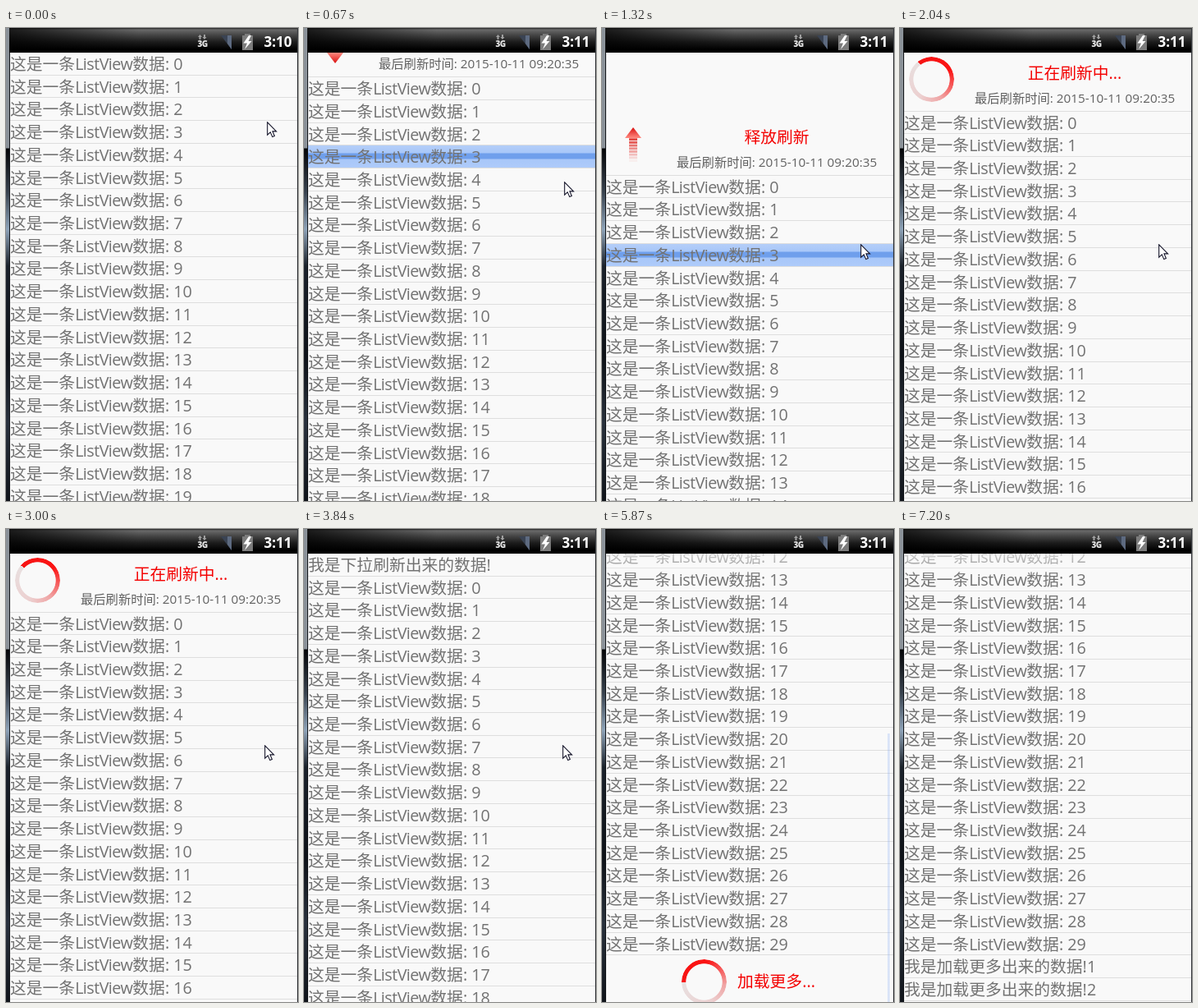
An HTML page that plays this animation: 356 px wide and 576 px high, repeating every 8 s.

```html
<!DOCTYPE html>
<html lang="zh-CN">
<head>
<meta charset="utf-8">
<title>ListView</title>
<style>
html, body { margin: 0; width: 100%; height: 100%; overflow: hidden; background: #000; }
#stage {
  position: relative; width: 356px; height: 576px; overflow: hidden; background: #15181c;
  font-family: 'Open Sans', 'Noto Sans CJK SC', 'Noto Sans CJK', sans-serif;
  font-size: 19.8px; line-height: 27.72px; color: #727272; white-space: nowrap;
}
#stage div, #stage svg { position: absolute; }
#edge {
  left: 0; top: 0; width: 4px; height: 576px;
  background: linear-gradient(#8b9299 146px, #050608 147px, #39434f 200px, #8ea3b8 245px, #1b222b 290px, #0e1218 400px, #2a323d 480px, #10141a);
}
#view { left: 5px; top: 30px; width: 350px; height: 546px; overflow: hidden; background: #f9f9f9; }
#list { left: 0; width: 350px; }
.row { left: 0; width: 350px; height: 26.72px; border-bottom: 1px solid #dedede; }
.row span { letter-spacing: -.55px; }
.press { background: linear-gradient(#b4cef8 0, #a8c7f9 9px, #6f9fec 10px, #6f9fec 16px, #a8c7f9 17px, #aecbfa); }
#head { left: 0; top: -72px; width: 350px; height: 71px; border-bottom: 1px solid #dedede; }
#title { left: 68px; top: 11px; width: 280px; text-align: center; color: #f40000; }
#stamp { left: 86px; top: 42px; font-size: 15.3px; color: #606060; }
#arrow { left: 23px; top: 12px; }
.ring {
  width: 55px; height: 55px; border-radius: 50%;
  background: conic-gradient(from -48deg, #f61414 0, #fb1414 100deg, #f65a5a 145deg, #f0a4a4 190deg, #ecd0d0 250deg, #e8e0e0 360deg);
  -webkit-mask: radial-gradient(circle, transparent 21.8px, #000 22.6px);
  mask: radial-gradient(circle, transparent 21.8px, #000 22.6px);
}
#head .ring { left: 5.5px; top: 5.5px; }
#foot { left: 0; width: 350px; height: 65px; }
#foot .ring { left: 92px; top: 5px; }
#more { left: 160px; top: 18px; color: #f40000; }
#fade { left: 0; top: 0; width: 350px; height: 28px; background: linear-gradient(rgba(249,249,249,.7), rgba(249,249,249,0)); }
#thumb { left: 343px; width: 3px; height: 546px; background: linear-gradient(90deg, #9cbcf7, #6c9af0, #9cbcf7); }
#bar {
  left: 4px; top: 0; width: 352px; height: 30px;
  background: linear-gradient(90deg, rgba(0,0,0,.75), rgba(0,0,0,0) 45%), linear-gradient(#222 0, #6a6a6a 2px, #484848 8px, #1c1c1c 17px, #000 26px);
}
#clock { left: 314.5px; top: 3px; font-size: 17px; font-weight: 700; color: #fff; }
#net { left: 233.5px; top: 12px; font-size: 10px; line-height: 14px; letter-spacing: -.5px; font-weight: 800; color: #e4e4e4; }
#rim { left: 355px; top: 0; width: 1px; height: 576px; background: #33363a; }
</style>
</head>
<body>
<div id="stage">
  <div id="edge"></div>
  <div id="view">
    <div id="list">
      <div id="head">
        <svg id="arrow" width="20" height="44">
          <defs><linearGradient id="red" x1="0" y1="0" x2="0" y2="1">
            <stop offset="0" stop-color="#ff8a80"/><stop offset="1" stop-color="#d90f0f"/>
          </linearGradient></defs>
          <path d="M0 30H20L10 43Z" fill="url(#red)"/>
        </svg>
        <div class="ring"></div>
        <div id="title"></div>
        <div id="stamp">最后刷新时间: 2015-10-11 09:20:35</div>
      </div>
      <div id="foot"><div class="ring"></div><div id="more">加载更多...</div></div>
    </div>
    <div id="fade"></div>
    <div id="thumb"></div>
  </div>
  <div id="bar"></div>
  <svg width="356" height="30">
    <path d="M236.5 8L239 11H237.5V14H235.5V11H234ZM242 14L239.5 11H241V8H243V11H244.5Z" fill="#a0a0a0"/>
    <path d="M262 9H275V26Z" fill="#3a4353"/>
    <path d="M270 9H275V26L270 19Z" fill="#5d6a80"/>
    <path d="M291 7H298V9H301V27H288V9H291Z" fill="#7c7c7c"/>
    <path d="M296 9L289.5 18.5H294L291 26L299.5 16H295.5L299 9Z" fill="#fff"/>
  </svg>
  <div id="net">3G</div>
  <div id="clock"></div>
  <div id="rim"></div>
  <svg id="cursor" width="14" height="21">
    <path d="M.7 .8V16.2L4.3 12.9L6.8 18.6L9.4 17.5L7 11.9H11.6Z" fill="#fff" stroke="#15152a" stroke-width="1.1"/>
  </svg>
</div>
<script>
const LOOP = 8000, PITCH = 27.72, HEAD = 72;
const PULL = 400, PRESS = 530, FLIP = 926, RELEASE = 1740, LOADED = 3840;
const GRAB = 4240, SCROLL = 4520, BOTTOM = 5210, APPENDED = 7200;

// spells of movement: start, end, number of picture changes
const SPELLS = [
  [PULL, 1320, 8], [RELEASE, 2690, 8], [2840, LOADED, 8],
  [GRAB, BOTTOM, 8], [5330, 6260, 8], [6380, APPENDED, 6]
];

const $ = id => document.getElementById(id);
const show = (el, on) => { el.style.visibility = on ? 'visible' : 'hidden'; };
const part = (t, a, b) => Math.min(1, Math.max(0, (t - a) / (b - a)));
const mix = (a, b, p) => a + (b - a) * p;

// the screen recorder's clock: evenly spaced changes in a spell, rest between
function snap(t) {
  const spell = SPELLS.findLast(s => s[0] <= t);
  if (!spell) return 0;
  const [a, b, n] = spell, step = (b - a) / (n - 1);
  return a + step * Math.min(n - 1, Math.floor((t - a + 12) / step));
}

const list = $('list');
function addRow(i, html) {
  const row = document.createElement('div');
  row.className = 'row';
  row.style.top = i * PITCH + 'px';
  row.innerHTML = html;
  list.append(row);
  return row;
}
const rows = Array.from({ length: 30 }, (_, i) => addRow(i, `这是一条<span>ListView</span>数据: ${i}`));
const fresh = addRow(-1, '我是下拉刷新出来的数据!');
const extra = [1, 2].map(n => addRow(29 + n, `我是加载更多出来的数据!${n}`));
$('foot').style.top = 30 * PITCH + 'px';

// fading stripes of the arrow's tail
for (let i = 0; i < 8; i++) {
  const bar = document.createElementNS('http://www.w3.org/2000/svg', 'rect');
  const at = { x: 5, y: 1 + i * 3.7, width: 10, height: 2.8, fill: '#e02a24', opacity: (i + .4) / 8.5 };
  for (const k in at) bar.setAttribute(k, at[k]);
  $('arrow').append(bar);
}
const rings = document.querySelectorAll('.ring');

function draw(time) {
  const t = snap(time);
  const done = t >= LOADED, busy = t >= RELEASE && !done, end = t >= APPENDED;

  const drag = part(t, PULL, 1320);
  const pull = done ? 0 : busy ? HEAD - .4 : 149.7 * drag ** 1.28;
  const scroll = 370 * part(t, SCROLL, BOTTOM) ** .876;
  list.style.top = pull - scroll + (done ? PITCH : 0) + 'px';

  show($('head'), !done);
  show(fresh, done);
  show($('foot'), !end);
  for (const row of extra) show(row, end);
  rows[3].classList.toggle('press', t >= PRESS && !busy && !done);

  $('title').textContent = busy ? '正在刷新中...' : pull > HEAD ? '释放刷新' : '下拉刷新';
  $('arrow').style.display = busy ? 'none' : '';
  $('arrow').style.transform = `rotate(${180 * part(t, FLIP, 1320)}deg)`;
  rings[0].style.display = busy ? '' : 'none';
  for (const ring of rings) ring.style.transform = `rotate(${(t - 2983) * .36}deg)`;

  show($('fade'), scroll > 0);
  $('thumb').style.top = Math.min(219, scroll * .674) + 'px';
  $('thumb').style.opacity = scroll > 0 ? 1 - part(t, 5460, 5990) : 0;
  $('clock').textContent = t < 660 ? '3:10' : '3:11';

  const x = mix(mix(318, 315, drag), 295, part(t, GRAB, 5100));
  const y = mix(mix(114, 262.5, drag * (2 - drag)), 442, part(t, GRAB, SCROLL)) - scroll;
  $('cursor').style.left = x + 'px';
  $('cursor').style.top = y + 'px';
  show($('cursor'), t < BOTTOM);
}

const start = performance.now();
function frame() {
  draw((performance.now() - start) % LOOP);
  requestAnimationFrame(frame);
}
frame();
</script>
</body>
</html>
```
